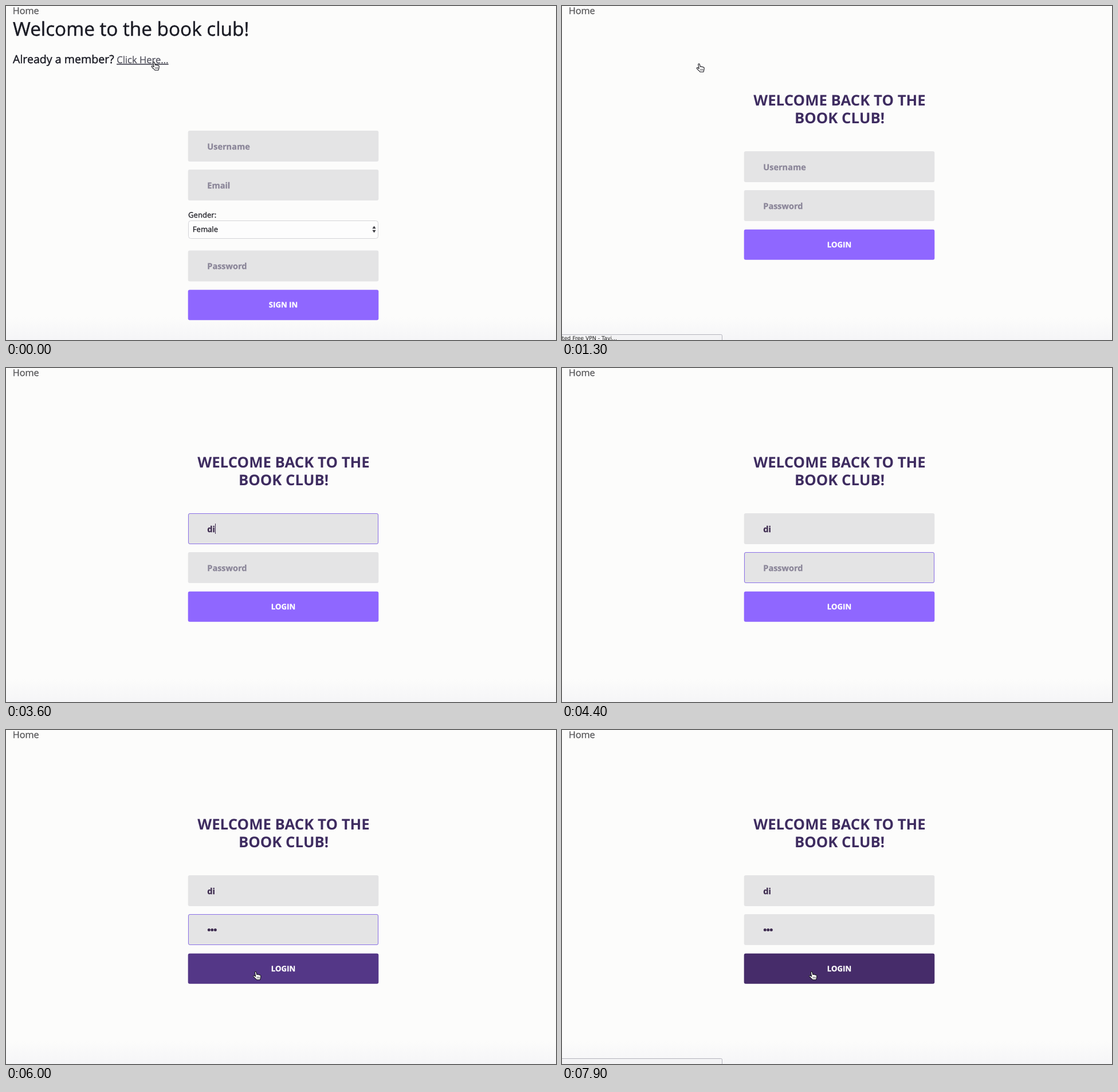
An HTML page for the animation above (8 s loop, 960 px wide and 584 px high).

```html
<!DOCTYPE html>
<html lang="en">
<head>
<meta charset="utf-8">
<title>Book club login</title>
<style>
  html, body { margin: 0; width: 100%; height: 100%; overflow: hidden; background: #fcfcfb; }
  svg { display: block; width: 960px; height: 584px; }
  text { font-family: "Open Sans", "Noto Sans", sans-serif; text-rendering: geometricPrecision; white-space: pre; stroke-width: .3px; }
  .title { font-size: 33.3px; fill: #1a1b24; stroke: #1a1b24; stroke-width: .5px; }
  .lead { font-size: 19.6px; fill: #1a1b24; stroke: #1a1b24; stroke-width: .45px; }
  .home { font-size: 16.2px; fill: #555557; stroke: #555557; }
  .link { font-size: 16.6px; fill: #53535f; stroke: #53535f; text-decoration: underline; }
  .small { font-size: 13.1px; fill: #1f1f26; stroke: #1f1f26; }
  .heading { font-size: 25.8px; font-weight: 700; fill: #3e2c60; text-anchor: middle; }
  .hint { font-size: 14.5px; font-weight: 700; fill: #8b8699; stroke: #8b8699; }
  .typed { fill: #3d2b4f; stroke: #3d2b4f; }
  .label { font-size: 13.2px; font-weight: 700; fill: #fff; stroke: #fff; text-anchor: middle; }
  .status { font-family: "DejaVu Sans", sans-serif; font-size: 9.3px; fill: #222; }
</style>
</head>
<body>
<svg id="stage" viewBox="0 0 960 584" xmlns="http://www.w3.org/2000/svg">
  <defs>
    <linearGradient id="floor" x1="0" y1="0" x2="0" y2="1">
      <stop offset="0" stop-color="#fcfcfb"/>
      <stop offset="1" stop-color="#f5f5f7"/>
    </linearGradient>
  </defs>
  <rect width="960" height="584" fill="#fcfcfb"/>
  <rect y="544" width="960" height="40" fill="url(#floor)"/>
  <text class="home" x="11.7" y="13.8">Home</text>
  <g id="signup"></g>
  <g id="login"></g>
  <g id="status">
    <path d="M-1 585V574.5H277.5Q279.5 574.5 279.5 576.5V585" fill="#f3f3f5" stroke="#b4b4bc"/>
    <text id="statusText" class="status" x="0" y="584">ted Free VPN - Tavi...</text>
  </g>
  <path id="caret" stroke="#3d2b4f" stroke-width="1"/>
  <g id="hand">
    <path d="M-.2 1.3C-.3-.3 1.8-.5 2.2 1L3.4 5.3C4.2 4.5 5.5 4.6 5.9 5.6C6.8 4.9 7.9 5.2 8.2 6.2
             C9.2 5.8 10.1 6.3 10.2 7.4C10.4 10 9.8 11.6 8.9 14.3H3C2.3 12.4-.6 11.2-2.6 8.5
             C-3.4 7.2-1.9 6.2-.9 7L1.2 8.5Z"
          fill="#fff" stroke="#16161c" stroke-width="1.1" stroke-linejoin="round"/>
    <path d="M3.9 8.8V12M5.9 8.8V12M7.8 8.8V12" stroke="#16161c" stroke-width=".7"/>
  </g>
  <path id="beam" d="M-3-6.5Q0-6.5 0-4.5Q0-6.5 3-6.5M0-5V5M-3 6.5Q0 6.5 0 4.5Q0 6.5 3 6.5M-1.5 2.5H1.5"
        fill="none" stroke="#222" stroke-width="1.1"/>
</svg>
<script>
const LOOP = 8000, STEP = 100;
const $ = id => document.getElementById(id);
const at = {
  status: 800, login: 1100, statusOff: 1900,
  userFocus: 2300, keyD: 3000, keyI: 3300,
  passFocus: 3900, dots: [4700, 4900, 5100],
  pointer: 5200, hover: 5800, press: 6400, wait: 6500
};

const box = (y, h, fill, id = "") =>
  `<rect ${id && `id="${id}"`} x="317.7" y="${y}" width="332.6" height="${h}" rx="3" fill="${fill}"/>`;
const write = (cls, x, y, str, id = "") =>
  `<text ${id && `id="${id}"`} class="${cls}" x="${x}" y="${y}">${str}</text>`;
const field = (y, hint, id) =>
  box(y, 54, "#e4e4e5") + write("hint", 351.3, y + 32.5, hint, id);
const ring = (y, id) =>
  `<g id="${id}" fill="none">
    <rect class="glow" x="317.5" y="${y - .5}" width="333" height="55" rx="3.5" stroke="#a298e0"/>
    <rect class="edge" x="318.5" y="${y + .5}" width="331" height="53" rx="2.5" stroke="#8b70e8"/>
  </g>`;

$("signup").innerHTML =
  write("title", 12, 52, "Welcome to the book club!") +
  write("lead", 12, 100, "Already a member?") +
  write("link", 193.2, 100, "Click Here...") +
  field(218, "Username") + field(286, "Email") +
  write("small", 318, 369.5, "Gender:") +
  `<rect x="318.5" y="375.5" width="331" height="31" rx="4" fill="#fdfdfd" stroke="#d4d4d8"/>
   <path d="M639.4 389.3L642.5 384.6L645.6 389.3ZM639.4 391.7L642.5 396.4L645.6 391.7Z" fill="#3a3a40"/>` +
  write("small", 325.8, 395, "Female") +
  field(427.5, "Password") + box(496.3, 52.9, "#8f67ff") +
  write("label", 484, 527, "SIGN IN");

$("login").innerHTML =
  write("heading", 484.5, 174, "WELCOME BACK TO THE") +
  write("heading", 484.5, 205, "BOOK CLUB!") +
  field(254, "Username", "user") + field(322, "Password", "pass") +
  ring(254, "userRing") + ring(322, "passRing") +
  `<g id="dots" fill="#3d2b4f">${[354.3, 359.8, 365.3].map(x => `<circle cx="${x}" cy="349.5" r="2.5"/>`).join("")}</g>` +
  box(390.8, 52.9, "#8f67ff", "button") +
  write("label", 484, 422, "LOGIN");

const show = (el, on) => { el.style.display = on ? "" : "none"; };
const clamp = v => Math.max(0, Math.min(1, v));
const ease = v => { v = clamp(v); return v * v * (3 - 2 * v); };
const mix = (a, b, k) => `rgb(${a.map((v, i) => Math.round(v + (b[i] - v) * k))})`;

// time, x, y of the pointer's rest points
const route = [
  [0, 257, 98], [900, 257, 98], [1300, 238, 101], [1500, 238, 101],
  [2200, 399.5, 296.5], [5200, 399.5, 296.5], [5800, 434.5, 422.5], [LOOP, 434.5, 422.5]
];
function pointer(t) {
  const i = route.findIndex(p => p[0] > t);
  const [a, b] = [route[i - 1], route[i]];
  const k = ease((t - a[0]) / (b[0] - a[0]));
  return [a[1] + (b[1] - a[1]) * k, a[2] + (b[2] - a[2]) * k];
}

// A pale outer line settles into a sharp inner edge.
function setRing(id, from, to, t) {
  const settled = ease((t - from) / 500);
  show($(id), t >= from && t < to);
  $(id).querySelector(".glow").style.opacity = 1 - settled;
  $(id).querySelector(".edge").style.opacity = settled;
}

function setCaret(t, typedUser, typedDots) {
  const inUser = t >= at.userFocus && t < at.passFocus;
  const inPass = t >= at.passFocus && t < at.press;
  const edits = [at.userFocus, at.keyD, at.keyI, at.passFocus, ...at.dots];
  const last = edits.filter(e => e <= t).pop();
  show($("caret"), (inUser || inPass) && Math.floor((t - last) / 500) % 2 === 0);
  const x = inPass ? 351.5 + typedDots * 5.6 : 351.5 + [0, 9, 14][typedUser.length];
  $("caret").setAttribute("d", `M${x} ${inPass ? 340 : 272}v18`);
}

function draw(t) {
  const onLogin = t >= at.login;
  show($("signup"), !onLogin);
  show($("login"), onLogin);

  const loading = t >= at.status && t < at.statusOff;
  show($("status"), loading || t >= at.wait);
  show($("statusText"), loading);

  const typedUser = t >= at.keyI ? "di" : t >= at.keyD ? "d" : "";
  $("user").textContent = typedUser || "Username";
  $("user").classList.toggle("typed", typedUser !== "");

  const typedDots = at.dots.filter(d => d <= t).length;
  show($("pass"), typedDots === 0);
  [...$("dots").children].forEach((dot, i) => show(dot, i < typedDots));

  setRing("userRing", at.userFocus, at.passFocus, t);
  setRing("passRing", at.passFocus, at.press, t);
  setCaret(t, typedUser, typedDots);

  const dark = clamp((t - at.hover) / 300);
  $("button").setAttribute("fill", mix([143, 103, 255], [70, 44, 106], 1 - (1 - dark) ** 1.5));

  const [x, y] = pointer(t);
  const overField = x > 318 && y > 254 && y < 376;
  const hidden = t >= at.keyD && t < at.pointer;
  for (const id of ["hand", "beam"]) $(id).setAttribute("transform", `translate(${x} ${y})`);
  show($("hand"), !hidden && !overField);
  show($("beam"), !hidden && overField);
}

const start = performance.now();
function tick() {
  const t = (performance.now() - start) % LOOP;
  draw(Math.floor(t / STEP) * STEP);
  requestAnimationFrame(tick);
}
draw(0);
requestAnimationFrame(tick);
</script>
</body>
</html>
```
